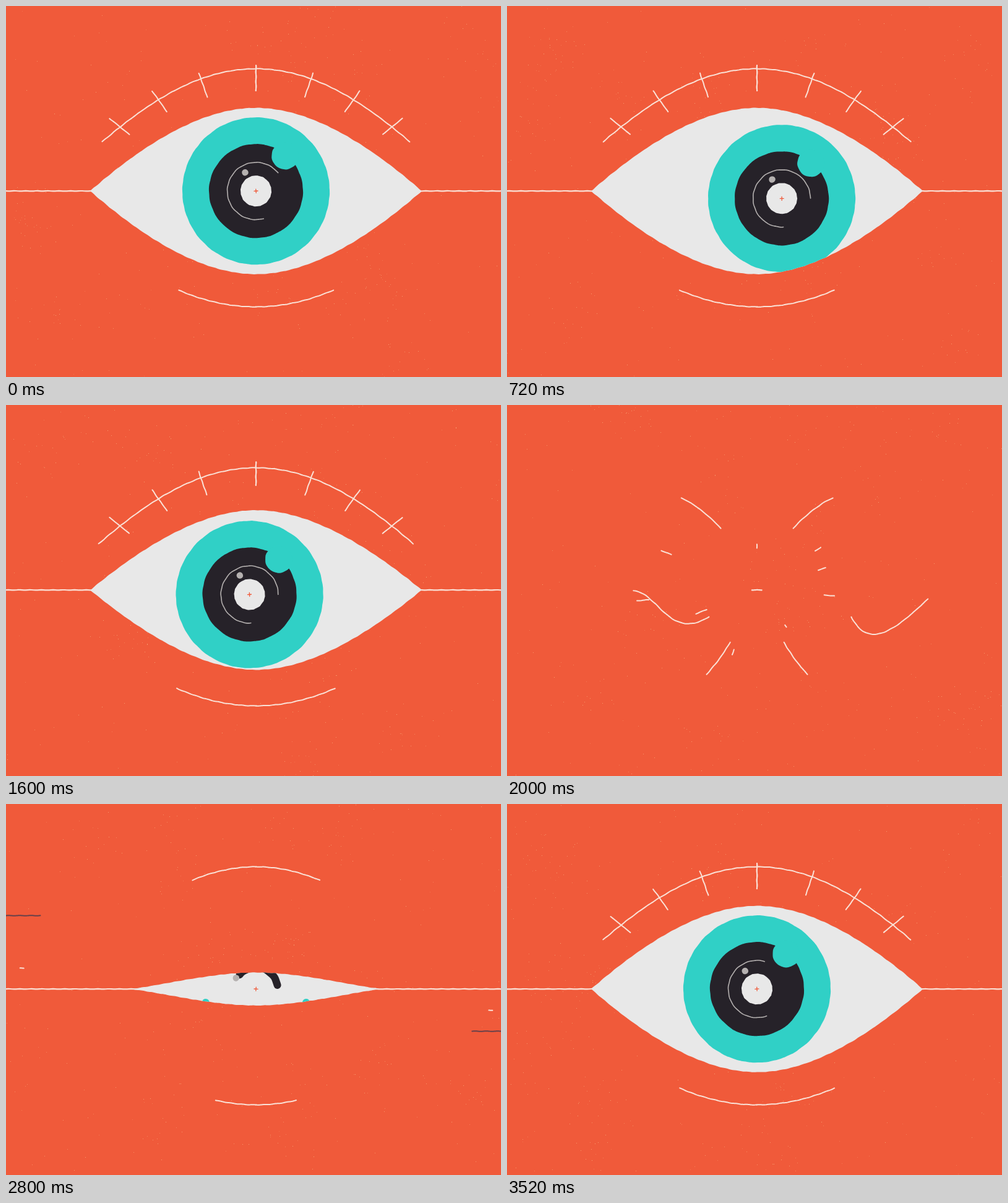
An HTML page with a canvas that plays this animation: 800 by 600 pixels, repeating every 3.6 s.

```html
<!DOCTYPE html>
<html lang="en">
<head>
<meta charset="utf-8">
<title>Eye</title>
<style>
  html, body { margin: 0; width: 100%; height: 100%; overflow: hidden; background: #f05a3a; }
  canvas { display: block; }
</style>
</head>
<body>
<canvas id="stage" width="800" height="600"></canvas>
<script>
const ctx = document.getElementById('stage').getContext('2d');
const LOOP = 3600, STEP = 80;
const CX = 403.5, CY = 298.7;
const BG = '#f05a3a', WHITE = '#e8e8e8', TEAL = '#30d0c6', DARK = '#262229';
const LINE = '#fae1d6', GREY = '#b5b1b0';
let seed = 0;

const lerp = (a, b, t) => a + (b - a) * t;
const clamp = v => Math.max(0, Math.min(1, v));
const polar = (x, y, r, deg) => {
  const a = deg * Math.PI / 180;
  return [x + r * Math.cos(a), y + r * Math.sin(a)];
};

// Progress 0..1 of time t through the span a..b.
const part = (t, a, b) => clamp((t - a) / (b - a));
const ease = (t, a, b) => { const p = part(t, a, b); return p * p * (3 - 2 * p); };
const easeOut = (t, a, b) => 1 - (1 - part(t, a, b)) ** 2;

function random(s) {
  return () => {
    s = s + 0x6d2b79f5 | 0;
    let r = Math.imul(s ^ s >>> 15, 1 | s);
    r = r + Math.imul(r ^ r >>> 7, 61 | r) ^ r;
    return ((r ^ r >>> 14) >>> 0) / 4294967296;
  };
}

const cubic = p => t => {
  const u = 1 - t;
  return [0, 1].map(i => u * u * u * p[0][i] + 3 * u * u * t * p[1][i]
    + 3 * u * t * t * p[2][i] + t * t * t * p[3][i]);
};
const straight = (x1, y1, x2, y2) => t => [lerp(x1, x2, t), lerp(y1, y2, t)];
const mirror = f => t => { const [x, y] = f(t); return [2 * CX - x, y]; };

// Hand-drawn edge: nudge each point by a small wave.
const rough = ([x, y]) => [
  x + .25 * Math.sin(y * .4 + seed * 1.7),
  y + .25 * Math.sin(x * .35 - seed * 1.7)
];

function trace(f, a, b, n = 90) {
  for (let i = 0; i <= n; i++) ctx.lineTo(...rough(f(lerp(a, b, i / n))));
}

function stroke(f, a = 0, b = 1, color = LINE, width = 2, n = 90) {
  if (b <= a) return;
  ctx.beginPath();
  trace(f, a, b, n);
  ctx.strokeStyle = color;
  ctx.lineWidth = width;
  ctx.stroke();
}

function both(f, a, b) {
  stroke(f, a, b);
  stroke(mirror(f), a, b);
}

function ring(x, y, r, a, b, color, width) {
  stroke(s => polar(x, y, r, s), a, b, color, width, 140);
}

function disc(x, y, r, color) {
  ctx.beginPath();
  trace(a => polar(x, y, r, a), 0, 360);
  ctx.fillStyle = color;
  ctx.fill();
}

function grain() {
  const r = random(seed * 977 + 5);
  const dot = (x, y) => {
    ctx.fillStyle = `rgba(250,205,150,${.2 + r() * .4})`;
    ctx.fillRect(Math.floor(x) - .5, Math.floor(y) - .5, 1, 1);
  };
  for (let i = 0; i < 200; i++) dot(r() * 800, r() * 600);
  for (let c = 0; c < 18; c++) {
    const x = r() * 800, y = r() * 600;
    for (let i = 0; i < 13; i++) dot(x + (r() + r() - 1) * 60, y + (r() + r() - 1) * 60);
  }
}

// Half curves, from the middle outwards.
const brow = cubic([[CX, 101], [315, 101], [237, 149], [155, 219]]);
const underline = t => [CX - 125 * t, 486 - 27 * t * t];

function brows(t) {
  if (t < 1840) {
    const inner = 1.1 * ease(t, 1640, 1840), outer = 1 + .1 * ease(t, 1500, 1820);
    both(brow, inner, outer);
    both(underline, inner, outer);
  } else {
    both(brow, 0, easeOut(t, 2694, 3160));
    both(underline, 0, easeOut(t, 2640, 3160));
  }
}

// Lashes fan out from a point below the eye's centre.
function lashes(t) {
  [0, 19.2, 35.4, 51].forEach((angle, i) => {
    const top = 277.5 + 3 * i * i;
    const f = s => polar(CX, 373, top - 41 * s, -90 - angle);
    const lift = 1.2 * ease(t, 1560 + i * 20, 1790 + i * 20);
    const grown = easeOut(t, 2880 + i * 50, 3040 + i * 50);
    if (t < 2400) both(f, -lift, 1 - 1.84 * lift);
    else both(f, 0, grown);
  });
}

function horizon(t) {
  const half = 410 * (1 - ease(t, 1800, 2018) + ease(t, 2320, 2640));
  if (half) stroke(straight(CX - half, CY, CX + half, CY), 0, 1, LINE, 2.2, 260);
}

const PULLS = [
  cubic([[281, 150], [300, 157], [330, 182], [345, 199]]),
  cubic([[322, 435], [335, 421], [349, 403], [360, 383]])
];
const SWIRLS = [
  cubic([[204, 300], [243, 302], [262, 382], [326, 342]]),
  cubic([[680, 313], [632, 358], [585, 400], [556, 342]])
];

// Lines run inwards after the eye has shut, among a few loose dashes.
function scatter(t) {
  const d = (t - 2000) / (2 * STEP);
  if (Math.abs(d) >= 1) return;
  const a = clamp(d), b = clamp(1 + d);
  PULLS.forEach(f => both(f, a, b));
  SWIRLS.forEach(f => stroke(f, a, b));
  const r = random(12);
  for (let i = 0; i < 9; i++) {
    const turn = i * 40 + r() * 30, dist = 70 + r() * 110, len = 5 + r() * 12;
    const f = s => {
      const [x, y] = polar(0, 0, dist + len * (s + d), turn);
      return [CX + x * 1.4, CY + y * .7];
    };
    stroke(f, a, b, LINE, 2, 8);
  }
}

function streaks(t) {
  if (t < 2560 || t > 2960) return;
  const d = (t - 2800) * 1.2;
  const pair = (x, y1, y2, len, color) => {
    stroke(straight(x - len - d, y1, x - d, y1), 0, 1, color);
    stroke(straight(808 - x + d, y2, 808 - x + len + d, y2), 0, 1, color);
  };
  pair(55, 180, 367, 100, '#66404a');
  pair(28, 265, 333, 6, LINE);
}

function iris(t) {
  const right = ease(t, 400, 640), left = ease(t, 880, 1120), back = ease(t, 1440, 1680);
  const x = CX + 40 * right - 80 * left + 40 * back;
  const y = CY + 12 * right + 16 * left - 28 * back;
  // The drawing-in runs on past the loop's end.
  const late = t < 2400 ? t + LOOP : t;

  const close = 110 * ease(late, 2800, 3080), thick = ease(late, 2800, 3120);
  ring(x, y, lerp(84, 95, thick), 15 - close, 165 + close, TEAL, lerp(12, 48, thick));
  ring(x, y, lerp(35, 50.5, thick), -139 - close * 1.06, -10 + close * 1.06, DARK, lerp(12, 51, thick));
  disc(...polar(x, y, 74, -50.3), 22 * easeOut(late, 3040, 3240), TEAL);

  const tail = 180 - 110 * easeOut(late, 3200, 3520) + 17 * ease(late, 3520, 3760);
  ring(x, y, 46.3, tail, 180 + 180 * ease(late, 3200, 3775), GREY, 1.6);
  const swing = ease(late, 2800, 3800);
  disc(...polar(x, y, 37 - 2.5 * swing, -151 + 34 * swing), 5.2, GREY);

  stroke(straight(x - 3, y, x + 3, y), 0, 1, BG, 1.3, 2);
  stroke(straight(x, y - 3, x, y + 3), 0, 1, BG, 1.3, 2);
}

function eye(t) {
  const open = 1 - ease(t, 1567, 1840) + ease(t, 2680, 3100);
  if (!open) return;
  const h = 134.5 * open, w = 180 + 88 * Math.min(1, open * 1.3);
  const lift = lerp(.12, .61, open);
  const lid = (sx, sy) => cubic([
    [CX - sx * w, CY],
    [CX - sx * w * lerp(.78, .65, open), CY - sy * h * lift],
    [CX - sx * w * lerp(.37, .31, open), CY - sy * h],
    [CX, CY - sy * h]
  ]);
  ctx.save();
  ctx.beginPath();
  trace(lid(1, 1), 0, 1);
  trace(lid(-1, 1), 1, 0);
  trace(lid(-1, -1), 0, 1);
  trace(lid(1, -1), 1, 0);
  ctx.closePath();
  ctx.fillStyle = WHITE;
  ctx.fill();
  ctx.clip();
  iris(t);
  ctx.restore();
}

function draw(now) {
  const t = Math.floor(now % LOOP / STEP) * STEP;
  seed = t / STEP;
  ctx.fillStyle = BG;
  ctx.fillRect(-1, -1, 802, 602);
  grain();
  horizon(t);
  brows(t);
  lashes(t);
  scatter(t);
  streaks(t);
  eye(t);
}

ctx.lineCap = ctx.lineJoin = 'round';
ctx.translate(.5, .5);
const start = performance.now();
function tick() {
  draw(performance.now() - start);
  requestAnimationFrame(tick);
}
tick();
</script>
</body>
</html>
```
